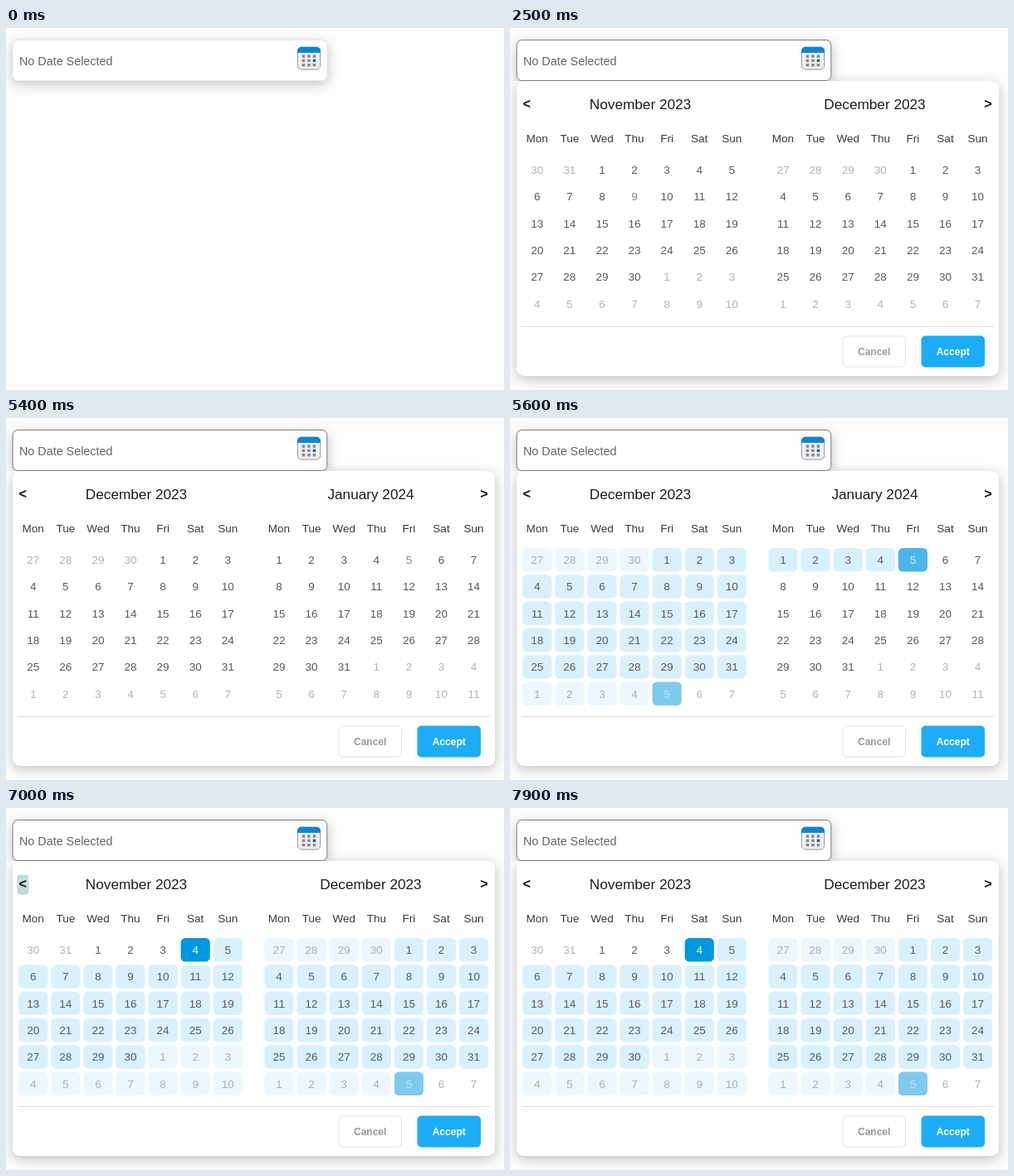
An HTML page with a canvas that plays this animation: 600x437 px, repeating every 8 s.

```html
<!DOCTYPE html>
<html lang="en">
<head>
<meta charset="utf-8">
<title>Date range picker</title>
<style>
html, body { margin: 0; width: 100%; height: 100%; overflow: hidden; background: #fefdfe; }
canvas { display: block; width: 600px; height: 437px; }
</style>
</head>
<body>
<canvas id="stage"></canvas>
<script>
const W = 600, H = 437, LOOP = 8000;
const FONT = '"Liberation Sans", Arial, sans-serif';
const DAYS = ['Mon', 'Tue', 'Wed', 'Thu', 'Fri', 'Sat', 'Sun'];
const MONTHS = ['January', 'February', 'March', 'April', 'May', 'June', 'July',
  'August', 'September', 'October', 'November', 'December'];
const COL = 39.1, ROW = 32.3;

const canvas = document.getElementById('stage');
const ctx = canvas.getContext('2d');
const ratio = window.devicePixelRatio || 1;
canvas.width = W * ratio;
canvas.height = H * ratio;

const day = (y, m, d) => Date.UTC(y, m, d);
const START = day(2023, 10, 4), END = day(2024, 0, 5);

// Pointer targets over time: [from, to, target]
const HOVERS = [
  [2400, 2600, day(2023, 10, 9)],
  [3200, 3500, 'next'],
  [4000, 4800, START],
  [4900, 5200, 'next'],
  [5400, 6400, END],
  [6700, 7300, 'prev']
];

function stateAt(t) {
  const hit = HOVERS.find(h => t >= h[0] && t < h[1]);
  return {
    open: t >= 1200,
    month: t >= 5000 && t < 6900 ? 11 : 10,
    start: t >= 4100 ? START : null,
    end: t >= 5500 ? END : null,
    hover: hit ? hit[2] : null
  };
}

function box(x, y, w, h, r, fill, stroke) {
  ctx.beginPath();
  ctx.roundRect(x, y, w, h, r);
  if (fill) { ctx.fillStyle = fill; ctx.fill(); }
  if (stroke) { ctx.strokeStyle = stroke; ctx.lineWidth = 1; ctx.stroke(); }
}

function card(x, y, w, h, r) {
  ctx.save();
  ctx.shadowColor = 'rgba(0,0,0,.24)';
  ctx.shadowBlur = 15 * ratio;
  ctx.shadowOffsetY = 4 * ratio;
  box(x, y, w, h, r, '#fff');
  ctx.restore();
}

function text(str, x, y, size, color, align = 'center', weight = 'normal') {
  ctx.font = `${weight} ${size}px ${FONT}`;
  ctx.textAlign = align;
  ctx.fillStyle = color;
  ctx.fillText(str, x, y);
}

function icon() {
  box(351.3, 23.3, 27.4, 26.8, 5, '#eeeef3', '#96969e');
  box(351, 22.8, 28, 7.2, [5, 5, 0, 0], '#0f86cc');
  for (let i = 0; i < 9; i++) {
    ctx.fillStyle = i === 5 ? '#1668a0' : '#88888e';
    ctx.fillRect(356.7 + (i % 3) * 6.5, 32.4 + Math.floor(i / 3) * 5.3, 3.5, 3.4);
  }
}

function field(open) {
  card(8, 14.5, 379, 49, 6);
  box(8.2, 14.5, 378.6, 49, 6, null, open ? '#7c7c7f' : '#e8e8eb');
  text('No Date Selected', 16, 45, 14.35, '#65656a', 'left');
  icon();
}

function arrow(sign, x, hot) {
  if (hot) box(x - 7, 80.5, 14, 24, 4, '#c2dcdd');
  text(sign, x, 97, 16.2, '#161616', 'center', 'bold');
}

function cell(date, x, y, inside, s) {
  const picked = date === s.start || date === s.end;
  const ranged = s.end && date > s.start && date < s.end;
  ctx.globalAlpha = (inside ? 1 : 0.5) * (date === s.hover && inside ? 0.7 : 1);
  if (picked || ranged) {
    box(x - 17.6, y - 14.2, 35.2, 28.5, 5.5, picked ? '#0098dd' : '#d9f1fd');
  }
  const color = picked ? '#fff' : inside ? '#5a5a5d' : '#69696d';
  text(new Date(date).getUTCDate(), x, y + 4.8, 13.5, color);
  ctx.globalAlpha = 1;
}

function month(index, left, mid, s) {
  const first = new Date(day(2023, index, 1));
  const m = first.getUTCMonth(), y = first.getUTCFullYear();
  const lead = (first.getUTCDay() + 6) % 7;
  text(`${MONTHS[m]} ${y}`, mid, 98, 17.2, '#1c1c1e');
  DAYS.forEach((name, c) => text(name, left + c * COL, 138, 13.5, '#3a3a3d'));
  for (let i = 0; i < 42; i++) {
    const date = day(y, m, 1 + i - lead);
    const inside = new Date(date).getUTCMonth() === m;
    cell(date, left + (i % 7) * COL, 171.2 + Math.floor(i / 7) * ROW, inside, s);
  }
}

function popup(s) {
  card(8, 63.7, 581, 356.3, 9);
  arrow('<', 20.3, s.hover === 'prev');
  arrow('>', 576, s.hover === 'next');
  month(s.month, 32.7, 157, s);
  month(s.month + 1, 329, 439.5, s);
  ctx.fillStyle = '#dedee1';
  ctx.fillRect(14, 360, 569, 1);
  box(401, 372, 75.5, 37, 5, '#fff', '#e2e2e7');
  text('Cancel', 438.7, 395.2, 12, '#9a9a9e', 'center', 'bold');
  box(495.5, 371.5, 76.5, 38, 5, '#1dadf6');
  text('Accept', 533.7, 395.2, 12, '#fff', 'center', 'bold');
}

function draw(t) {
  const s = stateAt(t);
  ctx.setTransform(ratio, 0, 0, ratio, 0, 0);
  ctx.fillStyle = '#fefdfe';
  ctx.fillRect(0, 0, W, H);
  // The open panel's shadow lies beneath the field's lower edge
  if (s.open) popup(s);
  ctx.save();
  if (s.open) {
    ctx.beginPath();
    ctx.rect(0, 0, W, 64);
    ctx.clip();
  }
  field(s.open);
  ctx.restore();
}

const origin = performance.now();
function tick() {
  draw((performance.now() - origin) % LOOP);
  requestAnimationFrame(tick);
}
tick();
</script>
</body>
</html>
```
